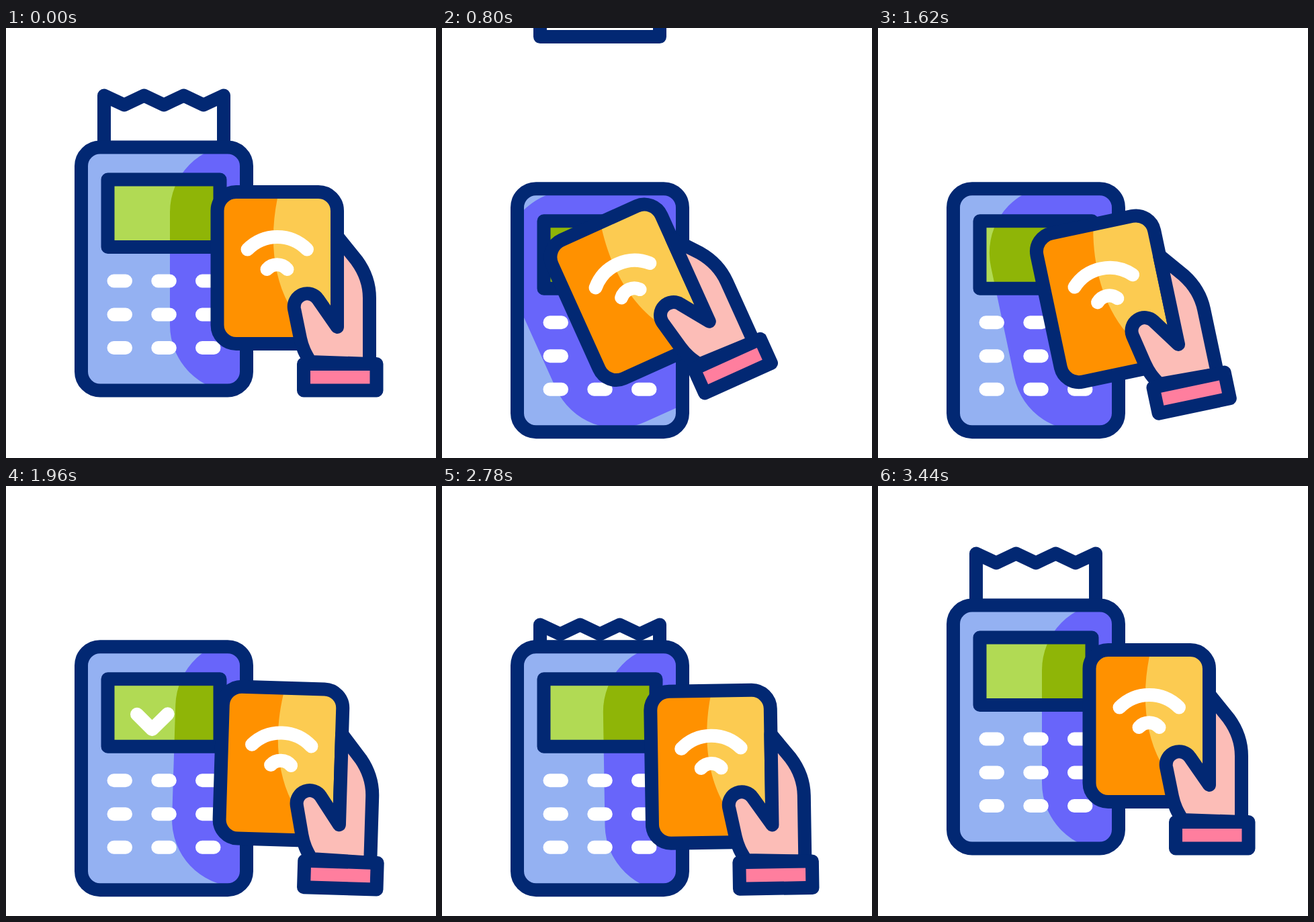
Write an HTML page that moves like this. It is 640 px wide and 640 px high and loops after 3600 ms.

```html
<!DOCTYPE html>
<html lang="en">
<head>
<meta charset="utf-8">
<title>Contactless payment</title>
<style>
  html, body { margin: 0; height: 100%; overflow: hidden; background: #fff; }
  svg { display: block; width: 100vw; height: 100vh; }
  .line { stroke: #022873; stroke-width: 20; stroke-linecap: round; stroke-linejoin: round; }
  .mark { fill: none; stroke: #fff; stroke-width: 20; stroke-linecap: round; stroke-linejoin: round; }
  .spark { stroke: #fccb51; }
</style>
</head>
<body>
<svg viewBox="0 0 640 640">
  <defs>
    <clipPath id="bodyClip"><rect x="112" y="177.5" width="246" height="362" rx="28"/></clipPath>
    <clipPath id="screenClip"><rect x="151.5" y="225.5" width="167" height="100.5"/></clipPath>
    <clipPath id="cardClip"><rect x="314.5" y="244" width="178.5" height="226" rx="28"/></clipPath>
    <rect id="shadow" x="244" y="174" width="420" height="368" rx="100"/>
  </defs>

  <path id="receipt" class="line" fill="#fff" d="M146 100.5L176 114.5L205.5 100.5L235 114.5L264.5 100.5L294 114.5L324 100.5V223H146Z"/>

  <path class="mark spark" pathLength="1" d="M194 187L170 163"/>
  <path class="mark spark" pathLength="1" d="M239 176V144"/>
  <path class="mark spark" pathLength="1" d="M284 187L308 163"/>

  <g class="terminal">
    <g clip-path="url(#bodyClip)">
      <rect x="102" y="167" width="266" height="383" fill="#94b1f2"/>
      <use href="#shadow" class="shade" fill="#6865fa"/>
    </g>
    <rect class="line" fill="none" x="112" y="177.5" width="246" height="362" rx="28"/>
    <g clip-path="url(#screenClip)">
      <rect x="151" y="225" width="168" height="102" fill="#b1da54"/>
      <use href="#shadow" class="shade" fill="#8fb507"/>
    </g>
    <rect class="line" fill="none" x="151.5" y="225.5" width="167" height="100.5"/>
    <path id="keys" class="mark"/>
    <path id="check" class="mark" pathLength="1" d="M195 278L217.5 300.5L265 253.5"/>
  </g>

  <g id="hand">
    <g clip-path="url(#cardClip)">
      <rect x="304" y="234" width="200" height="246" fill="#ff9100"/>
      <path fill="#fccb51" d="M406 244C393 300 394 362 421 412L450 470H500V244Z"/>
    </g>
    <rect class="line" fill="none" x="314.5" y="244" width="178.5" height="226" rx="28"/>
    <path class="mark" d="M359.5 329.5A62 62 0 0 1 448 329.5M388.5 359A20 20 0 0 1 418.5 359"/>
    <path class="line" fill="#fcbdb7" d="M453 497C445 484 441 476 438 462L429 418A19.5 19.5 0 0 1 464.5 404L493 445V310L522 346Q541 372 541 402V500Z"/>
    <rect class="line" fill="#ff7e9e" x="443" y="500" width="108.5" height="39.5"/>
  </g>
</svg>
<script>
const LOOP = 3600;
const $ = id => document.getElementById(id);
const terminal = document.querySelector('.terminal');
const shades = document.querySelectorAll('.shade');
const sparks = document.querySelectorAll('.spark');

let keys = '';
for (const y of [376.5, 426.5, 476])
  for (const x of [160.5, 226.3, 292]) keys += `M${x} ${y}h17.5`;
$('keys').setAttribute('d', keys);

// Each track is a list of [ms, value], eased in and out between neighbours.
const tracks = {
  bodyDrop: [[0, 0], [420, 61.7], [2927, 61.7], [3440, 0]],
  handDrop: [[0, 0], [405, 59.3], [2927, 59.3], [3440, 0]],
  angle: [[0, 0], [405, -24.3], [1200, -24.3], [2120, 4], [2590, -4], [3040, 4], [3440, 0]],
  reach: [[445, 0], [930, 1], [1200, 1], [1930, 0]],
  tear: [[0, 0], [1000, -234]],
  print: [[2500, 88], [2690, 44.3], [2800, 44.3], [3080, 0]],
  sparkEnd: [[960, 0], [1100, 1]],
  sparkStart: [[1160, 0], [1360, 1]],
  checkEnd: [[1780, 0], [2080, 1]],
  checkStart: [[2260, 0], [2560, 1]]
};

function at(name, t) {
  const track = tracks[name];
  const next = track.findIndex(key => key[0] > t);
  if (next < 0) return track[track.length - 1][1];
  if (next === 0) return track[0][1];
  const [t0, a] = track[next - 1], [t1, b] = track[next];
  const u = (t - t0) / (t1 - t0);
  return a + (b - a) * u * u * (3 - 2 * u);
}

function place(el, x, y, angle = 0) {
  el.setAttribute('transform', `translate(${x} ${y}) rotate(${angle} 497 540)`);
}

function trim(path, start, end) {
  path.style.display = end - start > 0.001 ? '' : 'none';
  path.setAttribute('stroke-dasharray', `${end - start} 9`);
  path.setAttribute('stroke-dashoffset', -start);
}

function draw(t) {
  const drop = at('bodyDrop', t), reach = at('reach', t), angle = at('angle', t);
  const handX = -68.4 * reach, handY = at('handDrop', t) - 94 * reach;
  place(terminal, 0, drop);
  place($('hand'), handX, handY, angle);
  shades.forEach(el => place(el, handX, handY - drop, angle));
  place($('receipt'), 0, t < 1200 ? at('tear', t) : drop + at('print', t));

  sparks.forEach(el => trim(el, at('sparkStart', t), at('sparkEnd', t)));
  trim($('check'), at('checkStart', t), at('checkEnd', t));
}

const began = performance.now();
function frame() {
  draw((performance.now() - began) % LOOP);
  requestAnimationFrame(frame);
}
frame();
</script>
</body>
</html>
```
